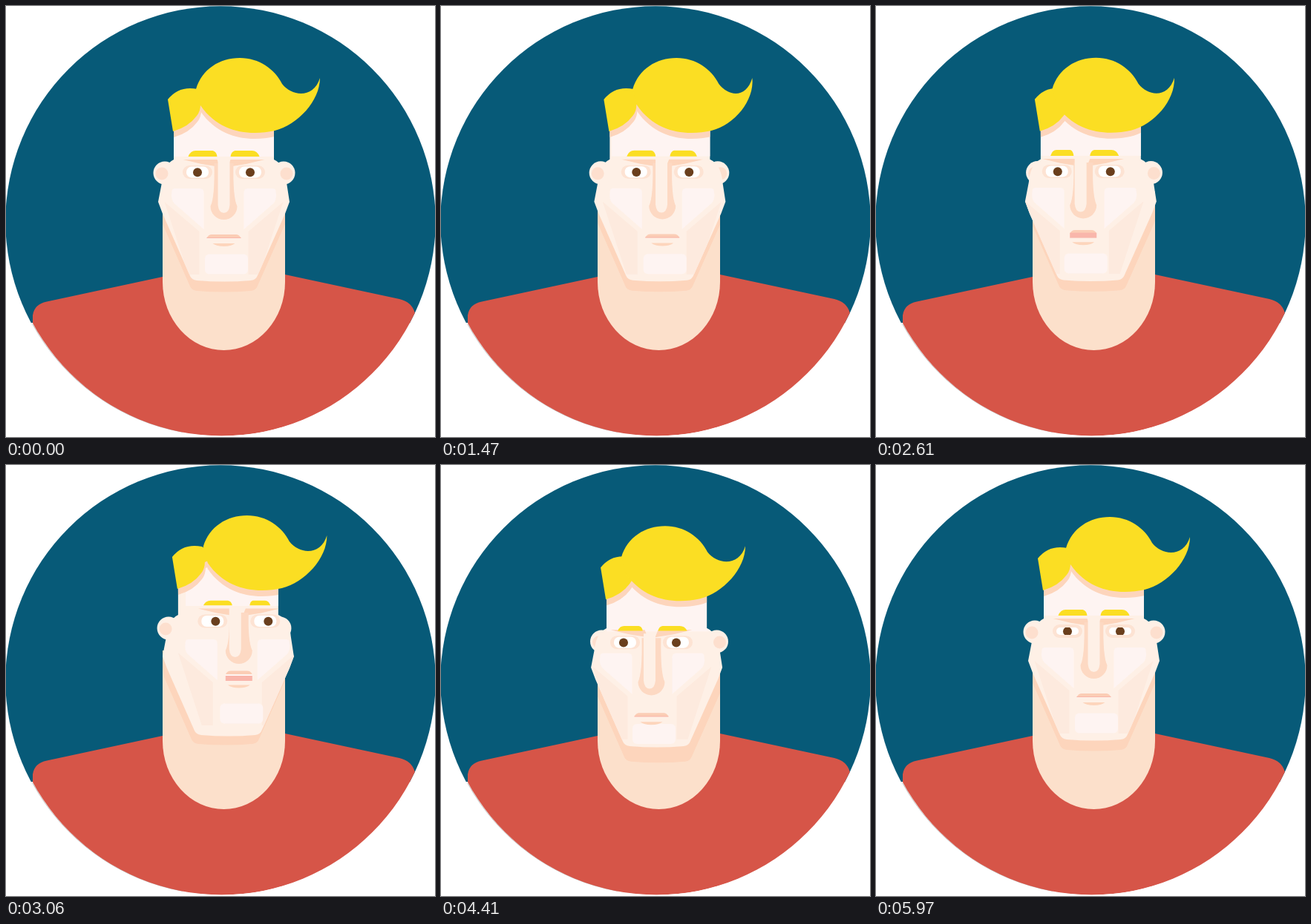
These frames come from a looping animation (578 by 581 pixels, 6 s). An HTML page with a canvas:

```html
<!DOCTYPE html>
<html lang="en">
<head>
<meta charset="utf-8">
<style>
html, body { margin: 0; width: 100%; height: 100%; overflow: hidden; background: #fff; }
canvas { display: block; }
</style>
</head>
<body>
<canvas id="stage" width="578" height="581"></canvas>
<script>
const ctx = document.getElementById('stage').getContext('2d');
const LOOP = 6000, BLINK = 270;
const BLUE = '#075a78', RED = '#d65548', YELLOW = '#fbde23', SKIN = '#fef0e6',
  NECK = '#fce0cb', SHADE = '#fdd5bc', PALE = '#fef4f2', WARM = '#fdeade';

// time, yaw, pitch, gaze, mouth opening
const POSES = [
  [1350, 0, 0, 0, 0], [1710, 18, -.1, 2, 0], [1800, 19, -.1, 2, 0],
  [2100, -14, -.05, 1, 1], [2580, -15, -.06, 1, 1],
  [2940, 20, -1, 4, 1], [3270, 21, -1, 4, 1],
  [3660, 8, 1, 7, 0], [3900, 7, 1, 7, 0],
  [4320, -10, 1.12, -2, 0], [5040, -10.5, 1.15, -2, 0], [5265, 0, 0, 0, 0]
];
const BLINKS = [0, 900, 3825, 5730];

const smooth = u => u * u * (3 - 2 * u);
const clamp = (v, lo, hi) => Math.max(lo, Math.min(hi, v));
const signed = (v, neg, pos) => v * (v < 0 ? neg : pos);
const hairShift = yaw => signed(yaw, 1.3, .48);

function poseAt(t) {
  const next = POSES.findIndex(p => p[0] > t);
  if (next < 1) return [0, 0, 0, 0];
  const a = POSES[next - 1], b = POSES[next];
  const u = smooth((t - a[0]) / (b[0] - a[0]));
  return a.slice(1).map((v, i) => v + (b[i + 1] - v) * u);
}

function blinkAt(t) {
  const start = BLINKS.find(s => t >= s && t < s + BLINK);
  return start === undefined ? 0 : Math.sin(Math.PI * (t - start) / BLINK);
}

function fill(d, color, x = 0, y = 0) {
  ctx.save();
  ctx.translate(x, y);
  ctx.fillStyle = color;
  ctx.fill(new Path2D(d));
  ctx.restore();
}

function disc(x, y, r, color) {
  ctx.fillStyle = color;
  ctx.beginPath();
  ctx.arc(x, y, r, 0, 7);
  ctx.fill();
}

function pill(x, y, w, h, r, color) {
  ctx.fillStyle = color;
  ctx.beginPath();
  ctx.roundRect(x - w / 2, y - h / 2, w, h, Math.min(r, h / 2));
  ctx.fill();
}

function clipped(clip, draw) {
  ctx.save();
  ctx.clip(clip);
  draw();
  ctx.restore();
}

// Draws once as given and once flipped about the middle of the face
function mirrored(x, y, draw) {
  for (const side of [1, -1]) {
    ctx.save();
    ctx.translate(293.5 + x, y);
    ctx.scale(side, 1);
    draw(side);
    ctx.restore();
  }
}

function circlePath(x, y, r) {
  const p = new Path2D();
  p.arc(x, y, r, 0, 7);
  return p;
}

function body() {
  const badge = circlePath(289, 290, 289.7);
  ctx.fillStyle = '#fff';
  ctx.fillRect(0, 0, 578, 581);
  clipped(new Path2D('M0,0H578V427H0Z'), () => {
    ctx.fillStyle = BLUE;
    ctx.fill(badge);
  });
  ctx.strokeStyle = '#333';
  ctx.lineWidth = .3;
  ctx.beginPath();
  ctx.arc(289.5, 289.5, 289.5, 1.75, 2.64);
  ctx.stroke();
  clipped(badge, () => clipped(circlePath(291, 289.5, 290), () =>
    fill('M36,581V417Q38,402 55,398.5L211,365L376,362L530,395Q547,399 551,414V581Z', RED)));
}

function eye(x, y, blink, gaze, drop) {
  pill(x, y, 40, 18, 9, '#fde3d3');
  const slot = new Path2D();
  const h = 15 * (1 - blink);
  if (h < .5) return;
  slot.roundRect(x - 15, y - h / 2, 30, h, Math.min(7, h / 2));
  clipped(slot, () => {
    ctx.fillStyle = '#fff';
    ctx.fillRect(x - 20, y - 10, 40, 20);
    disc(x + gaze, y + drop, 6, '#6a3f1d');
  });
}

function mouth(x, y, open, teeth) {
  const half = 23 - 5 * open, lift = (4 + 3 * teeth) * open;
  const lip = 313 - lift, gap = 312 - 4.5 * open;
  fill(`M${-half},${lip}Q${-half + 2},${lip - 5} ${-half + 7},${lip - 5}H${half - 7}Q${half - 2},${lip - 5} ${half},${lip}Z`,
    '#fbcdb5', x, y);
  ctx.fillStyle = '#fff';
  ctx.fillRect(x - half, y + lip, half * 2, Math.max(0, gap - lip));
  ctx.fillStyle = '#f9b6ab';
  ctx.fillRect(x - half, y + gap, half * 2, 1 + 6 * open);
  fill('M-15,320H15Q10,324 0,324Q-10,324 -15,320Z', SHADE, x, y);
}

function draw(t) {
  const [yaw, pitch, gaze, open] = poseAt(t);
  const blink = blinkAt(t);
  const headX = yaw * .29, hairX = hairShift(yaw);
  const topY = signed(pitch, 2, 11), jawY = signed(pitch, 6, 8), earY = signed(pitch, 5, 11.5);
  const eyeY = 13.5 * pitch, browY = signed(pitch, 13, 19);
  const noseY = 20 * pitch, mouthY = 23.5 * pitch, cheekY = signed(pitch, 11, 7);
  const bend = clamp(2.8 * (hairShift(poseAt(t - 90)[0]) - hairX), -9, 9);

  body();

  // Neck and the shadow of the jaw
  const neck = new Path2D('M211,250H376V372A82.5,92 0 0 1 211,372Z');
  ctx.fillStyle = NECK;
  ctx.fill(neck);
  const jaw = 'L211,280L248,364Q250,369 257,370Q294,373 330,370Q337,369 339,363L376,280L382,264';
  clipped(neck, () =>
    fill('M205,240' + jaw + 'V240Z', SHADE, yaw * .1, 14 + signed(pitch, 8, 14)));

  // Head
  const ear = side => {
    const x = 294 - side * (80 - Math.abs(yaw) * .25);
    disc(x, 225 + earY, 15.5, SKIN);
    disc(x - side * 4, 226 + earY, 8.5, '#fddfce');
  };
  const sides = [1, -1];
  sides.filter(s => s * yaw < 0).forEach(ear);
  const y = v => v + jawY;
  const head = new Path2D();
  head.addPath(new Path2D(
    `M226,${126 + topY}V${207 + earY}Q212,${214 + earY} 210,${y(238)}L205,${y(264)}L211,${y(280)}L248,${y(364)}` +
    `Q250,${y(369)} 257,${y(370)}Q294,${y(373)} 330,${y(370)}Q337,${y(369)} 339,${y(363)}` +
    `L376,${y(280)}L382,${y(264)}L378,${y(238)}Q376,${214 + earY} 361,${207 + earY}V${126 + topY}Z`),
    new DOMMatrix([1, 0, 0, 1, headX, 0]));
  ctx.fillStyle = SKIN;
  ctx.fill(head);
  sides.filter(s => s * yaw >= 0).forEach(ear);

  const tuft = 'M218,126Q233,107 258,112L280,125L262,133Q262,142 257,148Q246,163 225,169Z';
  const crest = 'M256,112C264,85 288,70 315,70C341,70 362,85 372,105' +
    `C386,123 ${415 + bend},124 ${423 + bend},97` +
    `C${423 + bend * .5},128 393,160 362,168C330,175 288,172 262,134Z`;

  clipped(head, () => {
    ctx.fillStyle = PALE;
    ctx.fillRect(226 + headX + Math.max(0, yaw * .5), 126 + topY, 140, 77 + browY - topY);

    // Planes of the cheeks and the chin
    mirrored(yaw * .9, cheekY, () => {
      fill('M-80,264L-33,304V362H-48Z', WARM);
      fill('M-66,246H-32Q-27,246 -27,252V301L-67,266Q-72,260 -70,250Q-70,246 -66,246Z', PALE);
    });
    pill(297 + yaw, 348 + 13 * pitch, 58, 27, 6, PALE);

    fill(tuft, SHADE, headX + 1, topY + 8);
    fill(crest, SHADE, hairX, topY + 8);

    // Eyes and the hollows under the brows
    mirrored(yaw, eyeY, () => fill('M-55,207H-9L-5,217L-30,213Z', SHADE));
    const drop = .3 + 4 * blink * Math.max(0, pitch);
    for (const x of [258, 329]) eye(x + yaw, 224 + eyeY, blink, gaze, drop);

    // Nose: the lit ridge slides aside as the head turns
    const n = v => v + noseY, top = 212 + browY, noseX = 293.5 + yaw;
    fill(`M-13,${top}Q-12,${n(258)} -18,${n(270)}A18,18 0 0 0 18,${n(270)}Q12,${n(258)} 13,${top}Z`,
      '#fdd9c3', noseX);
    fill(`M-8,${top - 6}V${n(268)}Q-7,${n(279)} 0,${n(279)}Q7,${n(279)} 8,${n(268)}V${top - 6}Z`,
      SKIN, noseX - Math.abs(yaw) * .25);

    mouth(293.5 + yaw, mouthY, open, Math.max(0, -pitch));

    // The brow on the far side looks shorter
    mirrored(yaw, 199 + browY, side => {
      ctx.translate(-28.5, 0);
      ctx.scale(1 - Math.max(0, -side * yaw) * .014, 1 - Math.abs(pitch) * .17);
      fill('M-19.5,4Q-16.5,-4 -9.5,-4H13.5Q18.5,-3 19.5,4Z', YELLOW);
    });
  });

  fill(tuft, YELLOW, headX, topY);
  fill(crest, YELLOW, hairX, topY);
}

function frame(now) {
  draw(now % LOOP);
  requestAnimationFrame(frame);
}
requestAnimationFrame(frame);
</script>
</body>
</html>
```
